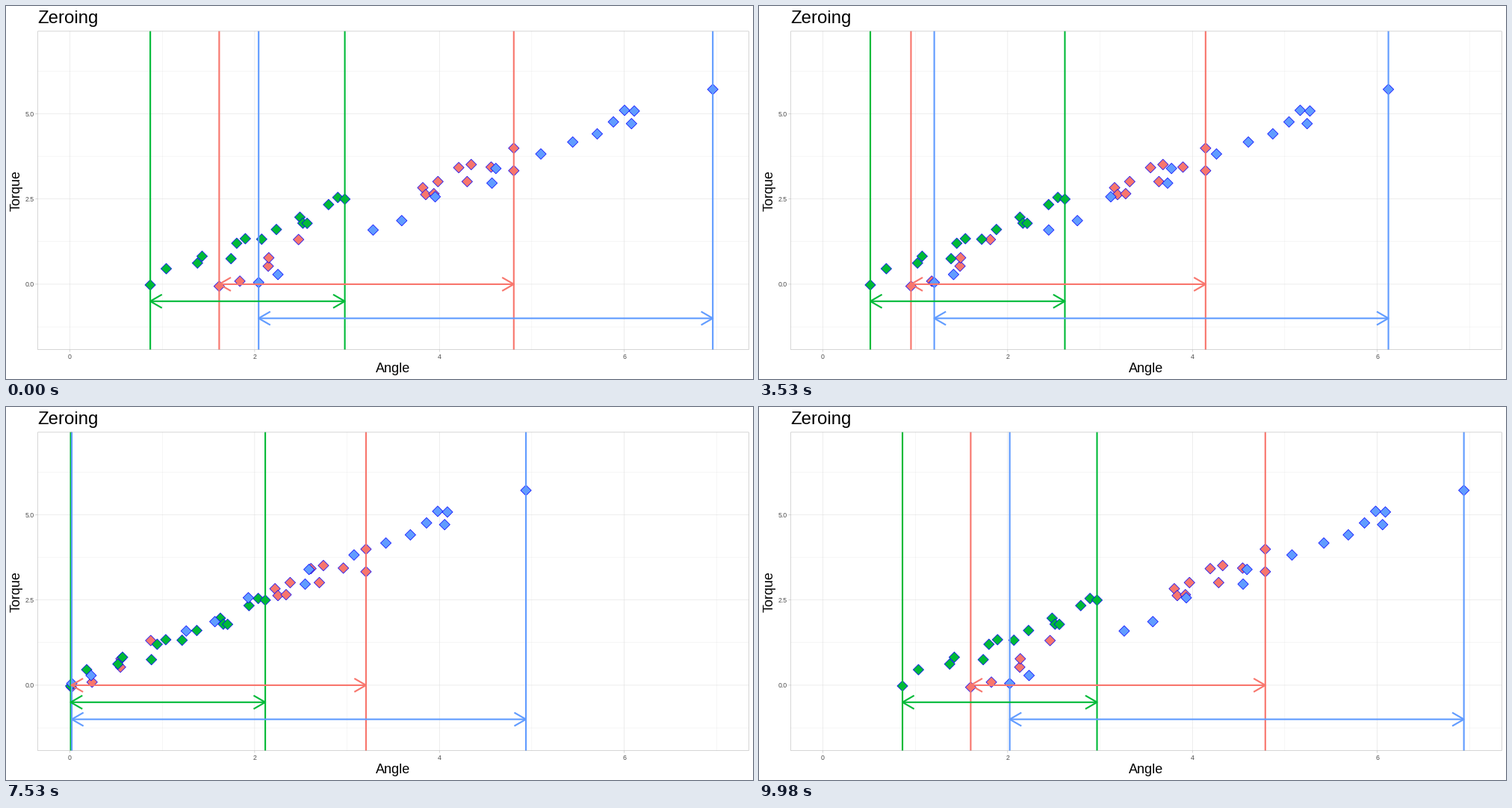
Recreate the animation shown at these times as a matplotlib script. Size 1000x500 px, loop 10 s.

```python
import matplotlib.pyplot as plt
import numpy as np
from matplotlib.animation import FuncAnimation
from matplotlib.collections import LineCollection, PolyCollection
from matplotlib.patches import Rectangle

plt.rcParams["font.family"] = "Liberation Sans"

W, H, DPI = 1000, 500, 100
PT = 72 / DPI  # points per pixel
LEFT, RIGHT, TOP, BOTTOM = 42.26, 994.52, 33.6, 460.9
SX = (RIGHT - LEFT) / 7.7
SY = (BOTTOM - TOP) / 9.35
FRAMES, INTERVAL, PHASE = 400, 25, 100

RED, GREEN, BLUE = "#F8766D", "#00BA38", "#619CFF"
GRID, BORDER, LABEL = "#DEDEDE", "#B3B3B3", "#4D4D4D"

# colour, angle offset, arrow height, zeroed angles, torques
GROUPS = [
    (RED, 1.616, 0.0,
     [0, .224, .531, .537, .859, 2.204, 2.236, 2.324, 2.368, 2.593, 2.684,
      2.728, 2.944, 3.189, 3.189],
     [-.06, .09, .53, .775, 1.31, 2.83, 2.63, 2.655, 3.01, 3.42, 3.01,
      3.51, 3.435, 3.99, 3.33]),
    (GREEN, .870, -0.5,
     [0, .173, .511, .561, .874, .936, 1.029, 1.206, 1.365, 1.620, 1.652,
      1.698, 1.930, 2.030, 2.106],
     [-.023, .455, .62, .82, .75, 1.20, 1.335, 1.32, 1.605, 1.965, 1.79,
      1.785, 2.335, 2.545, 2.495]),
    (BLUE, 2.043, -1.0,
     [0, .209, 1.239, 1.549, 1.911, 2.526, 2.568, 3.055, 3.400, 3.665, 3.840,
      3.961, 4.066, 4.036, 4.916],
     [.05, .285, 1.59, 1.865, 2.565, 2.965, 3.395, 3.82, 4.17, 4.41, 4.76,
      5.1, 5.08, 4.71, 5.715]),
]

DIAMOND = 7.13 * np.array([(-1, 0), (0, 1), (1, 0), (0, -1)])
HEAD_X, HEAD_Y = 18 * np.cos(np.pi / 6), 18 * np.sin(np.pi / 6)


def px(x):
    return LEFT + (np.asarray(x) + 0.35) * SX


def py(y):
    return BOTTOM - (np.asarray(y) + 1.925) * SY


fig = plt.figure(figsize=(W / DPI, H / DPI), dpi=DPI, facecolor="white")
ax = fig.add_axes([0, 0, 1, 1])
ax.set_xlim(0, W)
ax.set_ylim(H, 0)
ax.set_axis_off()


def add_lines(segments, color, width, z):
    lines = LineCollection(segments, colors=color, linewidths=width * PT,
                           capstyle="butt", joinstyle="round", zorder=z)
    lines.set_snap(False)
    ax.add_collection(lines, autolim=False)
    return lines


def add_grid(xs, ys, width):
    segments = [[(x, TOP), (x, BOTTOM)] for x in px(xs)]
    segments += [[(LEFT, y), (RIGHT, y)] for y in py(ys)]
    add_lines(segments, GRID, width, 1)


def add_text(x, y, text, size, **kw):
    ax.text(x, y, text, fontsize=size * PT, **kw)


def draw_frame():
    x_ticks, y_ticks = [0, 2, 4, 6], [0, 2.5, 5]
    add_grid([1, 3, 5, 7], [-1.25, 1.25, 3.75, 6.25], 0.27)
    add_grid(x_ticks, y_ticks, 0.53)
    # only the inner half of the panel border is visible
    half = 0.535
    ax.add_patch(Rectangle((LEFT + half / 2, TOP + half / 2),
                           RIGHT - LEFT - half, BOTTOM - TOP - half,
                           fill=False, ec=BORDER, lw=half * PT,
                           snap=False, zorder=6))
    ticks = [[(x, BOTTOM), (x, BOTTOM + 2.74)] for x in px(x_ticks)]
    ticks += [[(LEFT - 2.74, y), (LEFT, y)] for y in py(y_ticks)]
    add_lines(ticks, BORDER, 0.53, 1)

    for v in x_ticks:
        add_text(px(v), 473, str(v), 8.8, color=LABEL, ha="center")
    for v in y_ticks:
        add_text(37.3, py(v) + 3.1, f"{v:.1f}", 8.8, color=LABEL, ha="right")
    add_text(LEFT, 23, "Zeroing", 24)
    add_text((LEFT + RIGHT) / 2, 490.7, "Angle", 18, ha="center")
    add_text(18.5, (TOP + BOTTOM) / 2, "Torque", 18, ha="center",
             va="baseline", rotation=90, rotation_mode="anchor")


def arrow(x0, x1, y):
    def head(x, back):
        return [(x + back, y - HEAD_Y), (x, y), (x + back, y + HEAD_Y)]
    return [[(x0, y), (x1, y)], head(x0, HEAD_X), head(x1, -HEAD_X)]


def shapes(amount):
    """Diamonds, vertical lines and arrows for a share of the offsets."""
    diamonds, walls, arrows = [], [], []
    for _, offset, level, angles, torques in GROUPS:
        xs = px(np.array(angles) + offset * amount)
        diamonds += [DIAMOND + p for p in zip(xs, py(torques))]
        ends = xs[0], xs[-1]
        walls += [[(x, TOP), (x, BOTTOM)] for x in ends]
        arrows += arrow(*ends, py(level))
    return diamonds, walls, arrows


def offset_share(i):
    phase, step = divmod(i, PHASE)
    t = step / PHASE
    return [1, 1 - t, 0, t][phase]


draw_frame()
colors = [g[0] for g in GROUPS]
start = shapes(1)
points = PolyCollection(start[0], facecolors=np.repeat(colors, 15),
                        edgecolors="#0000FF", linewidths=0.71 * PT,
                        joinstyle="round", zorder=3)
points.set_snap(False)
ax.add_collection(points, autolim=False)
wall_lines = add_lines(start[1], np.repeat(colors, 2), 2.13, 4)
arrow_lines = add_lines(start[2], np.repeat(colors, 3), 2.13, 5)


def update(i):
    diamonds, walls, arrows = shapes(offset_share(i))
    points.set_verts(diamonds)
    wall_lines.set_segments(walls)
    arrow_lines.set_segments(arrows)
    return points, wall_lines, arrow_lines


anim = FuncAnimation(fig, update, frames=FRAMES, interval=INTERVAL,
                     repeat=True, repeat_delay=0, blit=False)
plt.show()
```
